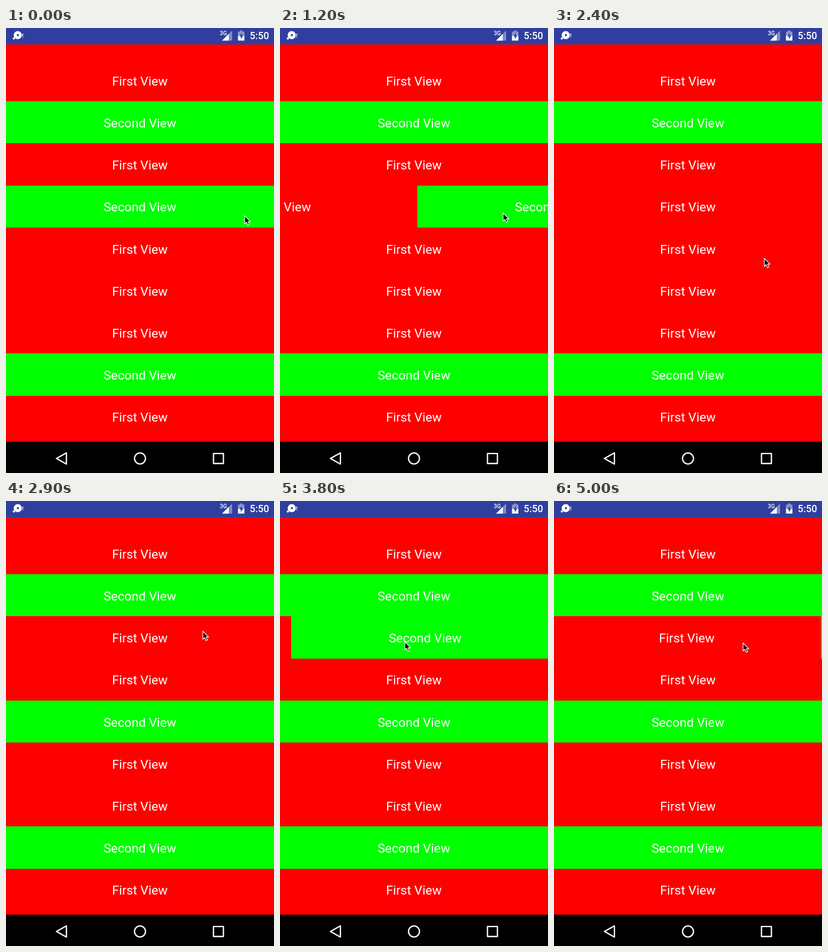
An HTML page that plays this animation: 480 by 796 pixels, repeating every 5.1 s.

```html
<!DOCTYPE html>
<html lang="en">
<head>
<meta charset="utf-8">
<title>Swipe rows</title>
<style>
html, body { margin: 0; width: 100%; height: 100%; overflow: hidden; background: #000; }
svg { display: block; width: 480px; height: 796px; }
text { font-family: Roboto, sans-serif; fill: #fff; }
.row text { font-size: 22.7px; text-anchor: middle; }
.nav { fill: none; stroke: #fff; stroke-width: 2.3; stroke-linejoin: round; }
</style>
</head>
<body>
<svg viewBox="0 0 480 796">
  <rect y="28" width="480" height="712" fill="#f00"/>
  <g id="rows"></g>

  <rect width="480" height="29.3" fill="#303f9f"/>
  <g fill="#fff">
    <circle cx="21" cy="12.8" r="7.3"/>
    <circle cx="14" cy="18.8" r="2"/>
    <circle cx="21.3" cy="12.8" r="2" fill="#303f9f"/>
    <rect x="29.3" y="10" width="1.4" height="4.4"/>
    <rect x="29.3" y="15.4" width="1.4" height="1.5"/>
    <path d="M387 22.5L405 4.5V22.5Z" opacity=".4"/>
    <path d="M387 22.5L399 10.5V22.5Z"/>
    <path d="M415.5 13.5v-7h3.5v-2h4.5v2h3.5v7z" opacity=".45"/>
    <path d="M415.5 13.5h11.5v9h-11.5z"/>
    <path d="M422.3 8.5l-4.3 6.8h2.7v5l4.3-7h-2.7z" fill="#303f9f"/>
  </g>
  <text x="383" y="13" font-size="10" font-weight="500">3G</text>
  <text x="436.6" y="20.4" font-size="17.5" font-weight="500">5:50</text>

  <rect y="740" width="480" height="56"/>
  <path class="nav" d="M90.3 770L108.2 760V780Z"/>
  <circle class="nav" cx="240" cy="770" r="9.8"/>
  <rect class="nav" x="371.6" y="761.2" width="17.8" height="17.8"/>

  <path id="cursor" d="M.6 1V15.2L3.8 12.3L6.2 17.6L8.7 16.5L6.4 11.3H10.8Z"
        stroke="#fff" stroke-width="1.2" stroke-linejoin="round"/>
</svg>
<script>
const LOOP = 5100, STEP = 100, SETTLE = 460;
const W = 480, TOP = 56, PITCH = 75.2, MID = 239.8;
const LAYOUT = "FSFSFFFSF"; // page shown in each row: First or Second

// pointer stops: [time, x, y]
const path = [
  [0, 427, 335], [900, 153, 325], [1200, 399, 330], [1800, 376, 411],
  [2400, 376, 411], [2500, 246, 400], [2900, 352, 232], [3500, 352, 250],
  [3600, 223, 251], [3800, 223, 251], [4600, 248, 253], [4700, 338, 253]
];
const swipes = [
  { row: 3, down: 900, up: 1200 },
  { row: 4, down: 2400, up: 2500 },
  { row: 2, down: 3500, up: 3600 },
  { row: 2, down: 4600, up: 4700 }
];

const lerp = (a, b, p) => a + (b - a) * p;
const easeOut = p => 1 - (1 - p) ** 5;

function pointer(t) {
  const next = path.findIndex(stop => stop[0] > t);
  if (next < 0) return path.at(-1).slice(1);
  const [t0, x0, y0] = path[next - 1], [t1, x1, y1] = path[next];
  const p = (t - t0) / (t1 - t0);
  return [lerp(x0, x1, p), lerp(y0, y1, p)];
}

// Left edge of a row's second page: follows the pointer, then settles.
function edge(row, t) {
  let x = LAYOUT[row] === "F" ? W : 0;
  for (const { down, up } of swipes.filter(s => s.row === row && s.down <= t)) {
    const dx = pointer(Math.min(t, up))[0] - pointer(down)[0];
    x += dx;
    if (t > up) x = lerp(x, dx > 0 ? W : 0, easeOut(Math.min(1, (t - up) / SETTLE)));
  }
  return Math.round(x);
}

const rows = document.getElementById("rows");
const cursor = document.getElementById("cursor");
const place = (el, x, y = 0) => el.setAttribute("transform", `translate(${x} ${y})`);

const pages = [...LAYOUT].map((_, i) => {
  const y = TOP + i * PITCH, top = Math.round(y);
  const base = Math.round(y + 46.7);
  rows.insertAdjacentHTML("beforeend", `<g class="row">
    <text x="${MID - W}" y="${base}">First View</text>
    <rect y="${top}" width="${W}" height="${Math.round(y + PITCH) - top}" fill="#0f0"/>
    <text x="${MID}" y="${base}">Second View</text></g>`);
  return rows.lastElementChild;
});

function draw(now) {
  const t = Math.floor((now % LOOP) / STEP) * STEP;
  pages.forEach((page, i) => place(page, edge(i, t)));
  place(cursor, ...pointer(t));
}

const begin = performance.now();
function tick() {
  draw(performance.now() - begin);
  requestAnimationFrame(tick);
}
tick();
</script>
</body>
</html>
```
